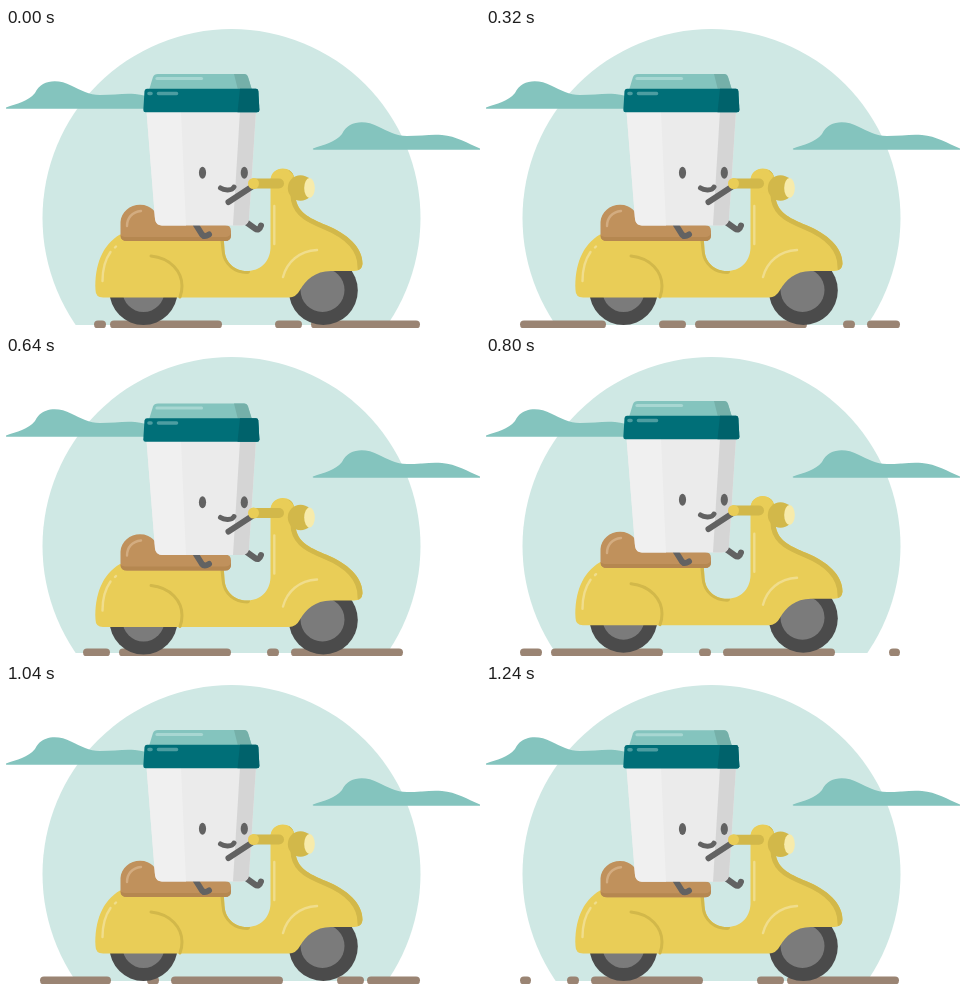
Write an HTML page that moves like this. It is 474 px wide and 300 px high and loops after 1.28 s.

```html
<!DOCTYPE html>
<html lang="en">
<head>
<meta charset="utf-8">
<title>Coffee ride</title>
<style>
  html, body { margin: 0; width: 100%; height: 100%; overflow: hidden; background: #fff; }
  svg { display: block; width: 100%; height: 100%; }
  .line { fill: none; stroke-linecap: round; stroke-linejoin: round; }
  .limb { stroke: #626262; stroke-width: 6; }
  .shine { stroke: #f0dd8c; stroke-width: 2.4; }
  .edge { stroke: #d2b84a; }
</style>
</head>
<body>
<svg viewBox="0 0 474 300">
  <defs>
    <path id="cloud" d="M307 120.500C318 116.500 329 114.500 336 106C342 92.500 359 91.500 372 98.500C382 103 390 108 401 108C415 108 425 106 436 107C450 108 462 115.500 474 120.500V121.700H308Q306 121.500 307 120.500Z" fill="#84c4be"/>
    <path id="shell" d="M89.500 262C88.500 238 96 217 114 206.500H217.500L218.500 222C219.500 236 230 243 241 243C254 243 264 234 264.500 220V153C264.500 137 287 137 288 150L290 172C293 186 306 191 320 197C342 206 357 220 356.500 236Q356 243 348 243H325C309 243 300 252 294 262Q290 269.500 283 269.500H97Q89.500 269.500 89.500 262Z"/>
    <clipPath id="shellClip"><use href="#shell"/></clipPath>
    <clipPath id="sky"><rect width="474" height="297"/></clipPath>
  </defs>

  <circle cx="225.500" cy="190" r="189" fill="#cfe8e4" clip-path="url(#sky)"/>
  <use href="#cloud" x="-307" y="-41"/>
  <use href="#cloud"/>
  <g id="road" class="line" stroke="#9a8473" stroke-width="8"></g>

  <g class="scooter">
    <circle cx="137.500" cy="263" r="34" fill="#4b4b4b"/>
    <circle cx="137.500" cy="263" r="21" fill="#7b7b7b"/>
    <circle cx="317.300" cy="262.500" r="34.500" fill="#4b4b4b"/>
    <circle cx="316.500" cy="262" r="22" fill="#7b7b7b"/>
    <use href="#shell" fill="#e9cd57"/>
    <g clip-path="url(#shellClip)">
      <path class="line edge" stroke-width="10" d="M287 145L290 172C293 186 306 191 320 197C342 206 357 220 356.500 240"/>
      <path class="line edge" stroke-width="6" d="M217.500 213L218.500 222C219.500 236 230 243 241 243"/>
    </g>
    <path class="line edge" stroke-width="3" d="M145 228C165 230 176 244 176 258Q176 264 174 269"/>
    <path class="line shine" d="M96.500 253C96.500 241 99.500 231 104.500 224M109 219.500L110 218.500M268.300 178V216M277 249C281 234 293 223 311 222"/>
  </g>

  <g class="rider">
    <path fill="#c0915c" d="M114.500 207V194C115 184 124 176.700 134 176.700C146 176.700 150 185 153 190Q157 197 166 197H219Q225 197 225 203V207Q225 213 219 213H121Q114.500 213 114.500 207Z"/>
    <path fill="#b58750" d="M114.500 207Q116 209 121 209H219Q224 209 225 205V207Q225 213 219 213H121Q114.500 213 114.500 207Z"/>
    <path class="line" stroke="#d3ac80" stroke-width="2.400" d="M121 198C121 190 126 184 135 183"/>

    <path class="line limb" d="M190 197L196 206.500Q198.500 209.500 203 206.500M238.500 193L249 200.500Q253 203.500 255 197.500"/>
    <path fill="#ebebeb" d="M140.500 83H250L243 191Q242 197.500 236 197.500H156Q150 197.500 149 191Z"/>
    <path fill="#f0f0f0" d="M140.500 83H175L180 197.500H156Q150 197.500 149 191Z"/>
    <path fill="#d5d5d5" d="M234 83H250L243 191Q242 197.500 236 197.500H227Z"/>
    <path fill="#84c4be" d="M143 62L147 49Q148 46 152 46H238Q241 46 242 49L246 62Z"/>
    <path fill="#75b0a9" d="M228 46H238Q241 46 242 49L246 62H232Z"/>
    <path class="line" stroke="#a8d7d2" stroke-width="3.200" d="M151 50.500H195.500"/>
    <path fill="#006f78" d="M141 60.700H250Q252 60.700 252.300 63L253.400 82Q253.400 84.300 251 84.300H139.500Q137.300 84.300 137.300 82L138.500 63Q139 60.700 141 60.700Z"/>
    <path fill="#00626b" d="M234 60.700H250Q252 60.700 252.300 63L253.400 82Q253.400 84.300 251 84.300H231.500Z"/>
    <path class="line" stroke="#4d9da1" stroke-width="3.600" d="M143 65.500H145M152.500 65.500H170.500"/>
    <ellipse cx="196.500" cy="144.800" rx="3.600" ry="6" fill="#626262"/>
    <ellipse cx="238.300" cy="144.800" rx="3.600" ry="6" fill="#626262"/>
    <path class="line" stroke="#626262" stroke-width="5" d="M214.500 160C218 162.500 226 163 228 159"/>
    <path class="line limb" d="M222.500 174L247 158"/>

    <circle cx="276.500" cy="153" r="12" fill="#e9cd57"/>
    <path class="line edge" stroke-width="10" d="M248 155.500H273"/>
    <circle cx="247.500" cy="155.500" r="5.500" fill="#e9cd57"/>
    <circle cx="294.500" cy="160" r="12.700" fill="#d2b84a"/>
    <ellipse cx="303.500" cy="160" rx="5.300" ry="10" fill="#f7ebab"/>
  </g>
</svg>
<script>
const LOOP = 1280, STEP = 40;
const SPEED = 0.3;                     // road, px per ms
const ROAD = { left: 34, right: 414, y: 296.5, cap: 4 };
const DOT = 12, SHORT = 27, LONG = 112;

// Left end at the start of the loop, and length.
const dashes = [
  [88, DOT], [104, LONG], [269, SHORT], [305, LONG],
  [453, DOT], [477, LONG], [643, SHORT], [673, LONG]
];

const lines = dashes.map(() => {
  const line = document.createElementNS("http://www.w3.org/2000/svg", "line");
  line.setAttribute("y1", ROAD.y);
  line.setAttribute("y2", ROAD.y);
  return document.getElementById("road").appendChild(line);
});

function drawRoad(t) {
  dashes.forEach(([x, length], i) => {
    const left = x - SPEED * t;
    const x1 = Math.max(left, ROAD.left) + ROAD.cap;
    const x2 = Math.min(left + length, ROAD.right) - ROAD.cap;
    lines[i].style.display = x2 > x1 ? "" : "none";
    lines[i].setAttribute("x1", x1);
    lines[i].setAttribute("x2", x2);
  });
}

// A bump in the road: a spring that dies away.
const BUMP = 560, SWING = 320;
function bob(t, size, decay) {
  const u = Math.max(0, t - BUMP);
  return size * Math.exp(-u / decay) * Math.sin(2 * Math.PI * u / SWING);
}

function shift(selector, y) {
  document.querySelectorAll(selector).forEach(el => el.setAttribute("transform", `translate(0 ${y})`));
}

function draw(time) {
  const t = Math.floor((time % LOOP) / STEP) * STEP;
  drawRoad(t);
  shift(".rider", bob(t, 1.84, 395));
  shift(".scooter", bob(t, 3.3, 100));
}

const start = performance.now();
function tick() {
  draw(performance.now() - start);
  requestAnimationFrame(tick);
}
tick();
</script>
</body>
</html>
```
